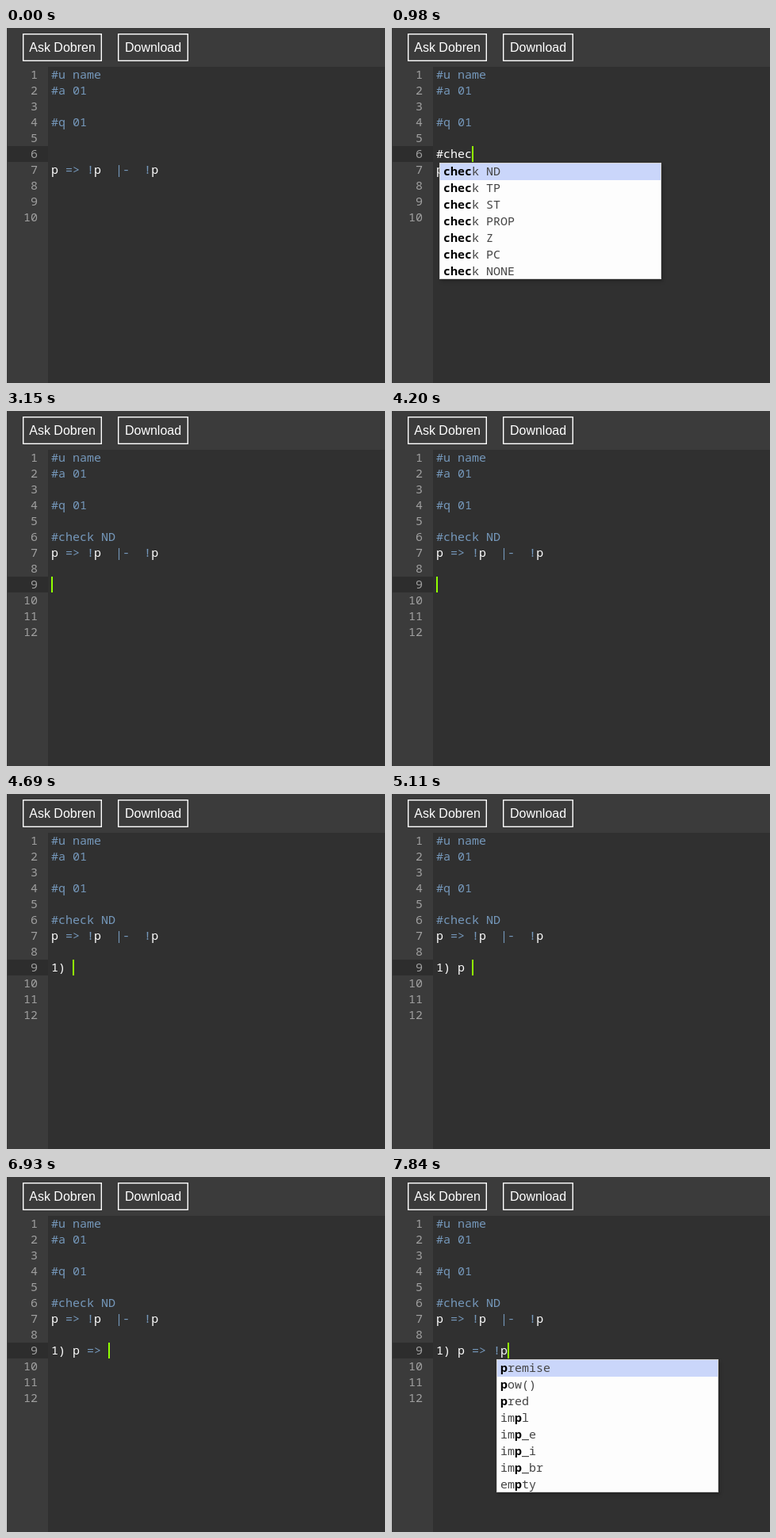
Animation of 478x448 px, one loop 8 s. Source, as an HTML page:

```html
<!DOCTYPE html>
<html lang="en">
<head>
<meta charset="utf-8">
<title>Proof editor</title>
<style>
  html, body { margin: 0; width: 100%; height: 100%; overflow: hidden; background: #303030; }
  svg { display: block; }
  text { white-space: pre; font: 15px "Noto Sans Mono", "DejaVu Sans Mono", monospace; font-variant-ligatures: none; }
  .label { font: 16px "Liberation Sans", Arial, sans-serif; fill: #fff; text-anchor: middle; }
  .number { fill: #a0a0a0; text-anchor: end; }
  .code { fill: #fff; }
  .token { fill: #7598bb; }
  .item { fill: #444; }
  .match { fill: #000; font-weight: 700; }
  #popup { filter: drop-shadow(2px 3px 2px rgba(0, 0, 0, .2)); }
</style>
</head>
<body>
<svg id="stage" width="478" height="448" viewBox="0 0 478 448">
  <rect width="478" height="448" fill="#303030"/>
  <path d="M0 0H478V49H53V448H0Z" fill="#3b3b3b"/>
  <rect id="active" x="2" width="51" height="20" fill="#2d2d2d"/>
  <rect width="1" height="448" fill="#dcdcdc"/>
  <g fill="none" stroke="#fff" stroke-width="1.4">
    <rect x="21.7" y="7.7" width="98.6" height="33.6"/>
    <rect x="141.7" y="7.7" width="87.6" height="33.6"/>
  </g>
  <text class="label" x="71" y="30">Ask Dobren</text>
  <text class="label" x="185.5" y="30">Download</text>
  <g id="numbers"></g>
  <g id="lines"></g>
  <rect id="cursor" width="2" height="20" fill="#91ff00"/>
  <g id="popup"></g>
</svg>
<script>
const LOOP = 8000, LEFT = 57, TOP = 49, CHAR = 9, LINE = 20, ITEM = 21;
const $ = id => document.getElementById(id);

const checks = ["ND", "TP", "ST", "PROP", "Z", "PC", "NONE"].map(kind => "check " + kind);
const checksAndMore = [...checks, "schema"];
const rules = ["premise", "pow()", "pred", "impl", "imp_e", "imp_i", "imp_br", "empty"];

// Each step overrides the state left by the steps before it.
const start = { row: 6, col: 0, command: "", proof: "", count: 10, items: [], prefix: "", cursor: 0 };
const steps = [
  [70, { command: "#", col: 1, cursor: 1 }],
  [350, { command: "#c", col: 2 }],
  [420, { items: checksAndMore, prefix: "c" }],
  [560, { command: "#ch", col: 3, prefix: "ch" }],
  [770, { command: "#che", col: 4, items: checks, prefix: "che" }],
  [980, { command: "#chec", col: 5, prefix: "chec" }],
  [1050, { command: "#check ND", col: 9, items: [] }],
  [1470, { cursor: .75 }],
  [1540, { cursor: .5 }],
  [1610, { cursor: .25 }],
  [1680, { cursor: 0 }],
  [1960, { row: 7, cursor: 1 }],
  [2310, { col: 15 }],
  [2870, { row: 8, col: 0, count: 11 }],
  [3080, { row: 9, count: 12 }],
  [3780, { proof: "1", col: 1 }],
  [3850, { items: ["01"], prefix: "1" }],
  [3990, { items: ["01", "10"] }],
  [4200, { proof: "", col: 0, items: [] }],
  [4410, { proof: "1", col: 1 }],
  [4480, { items: ["01", "10"] }],
  [4620, { proof: "1)", col: 2, items: [] }],
  [4690, { proof: "1) ", col: 3 }],
  [4900, { proof: "1) p", col: 4 }],
  [4970, { items: rules, prefix: "p" }],
  [5110, { proof: "1) p ", col: 5, items: [] }],
  [5600, { proof: "1) p =", col: 6 }],
  [5950, { proof: "1) p =>", col: 7 }],
  [6090, { proof: "1) p => ", col: 8 }],
  [6230, { proof: "1) p => p", col: 9, items: rules }],
  [6720, { proof: "1) p => ", col: 8, items: [] }],
  [7560, { cursor: 0 }],
  [7700, { proof: "1) p => !", col: 9, cursor: 1 }],
  [7770, { proof: "1) p => !p", col: 10 }],
  [7840, { items: rules }]
];

const rowTop = row => TOP + (row - 1) * LINE;
const escapeText = s => s.replace(/&/g, "&amp;").replace(/</g, "&lt;").replace(/>/g, "&gt;");
const span = (kind, s) => `<tspan class="${kind}">${escapeText(s)}</tspan>`;
const textAt = (kind, x, y, body) => `<text class="${kind}" x="${x}" y="${y}">${body}</text>`;

function highlight(line) {
  if (/^#([uaq] |check )/.test(line)) return span("token", line);
  return line.split(/(=>|!|\|-)/).map((part, i) => i % 2 ? span("token", part) : escapeText(part)).join("");
}

function drawPopup({ items, prefix, row, col }) {
  if (!items.length) return "";
  const x = LEFT + (col - prefix.length) * CHAR - 5;
  const y = rowTop(row) + LINE + 1;
  const height = items.length * ITEM;
  const rows = items.map((item, i) => {
    const at = item.indexOf(prefix), end = at + prefix.length;
    const body = escapeText(item.slice(0, at)) + span("match", prefix) + escapeText(item.slice(end));
    return textAt("item", x + 5, y + i * ITEM + 16, body);
  });
  return `<rect x="${x}" y="${y}" width="280" height="${height}" fill="#fdfdfd"/>
    <rect x="${x}" y="${y}" width="280" height="${ITEM + 1}" fill="#cad6fa"/>
    <rect x="${x + .5}" y="${y + .5}" width="279" height="${height - 1}" fill="none" stroke="#d3d3d3"/>` + rows.join("");
}

let shown = -1;
function render(time) {
  const passed = steps.filter(([at]) => at <= time);
  if (passed.length === shown) return;
  shown = passed.length;
  const state = Object.assign({}, start, ...passed.map(([, change]) => change));
  const lines = ["#u name", "#a 01", "", "#q 01", "", state.command, "p => !p  |-  !p", "", state.proof];

  $("numbers").innerHTML = Array.from({ length: state.count }, (_, i) =>
    textAt("number", 40, rowTop(i + 1) + 15, i + 1)).join("");
  $("lines").innerHTML = lines.map((line, i) =>
    textAt("code", LEFT, rowTop(i + 1) + 15, highlight(line))).join("");
  $("active").setAttribute("y", rowTop(state.row));
  $("cursor").setAttribute("x", LEFT + state.col * CHAR);
  $("cursor").setAttribute("y", rowTop(state.row));
  $("cursor").setAttribute("opacity", state.cursor);
  $("popup").innerHTML = drawPopup(state);
}

const began = performance.now();
function tick() {
  render((performance.now() - began) % LOOP);
  requestAnimationFrame(tick);
}
tick();
</script>
</body>
</html>
```
